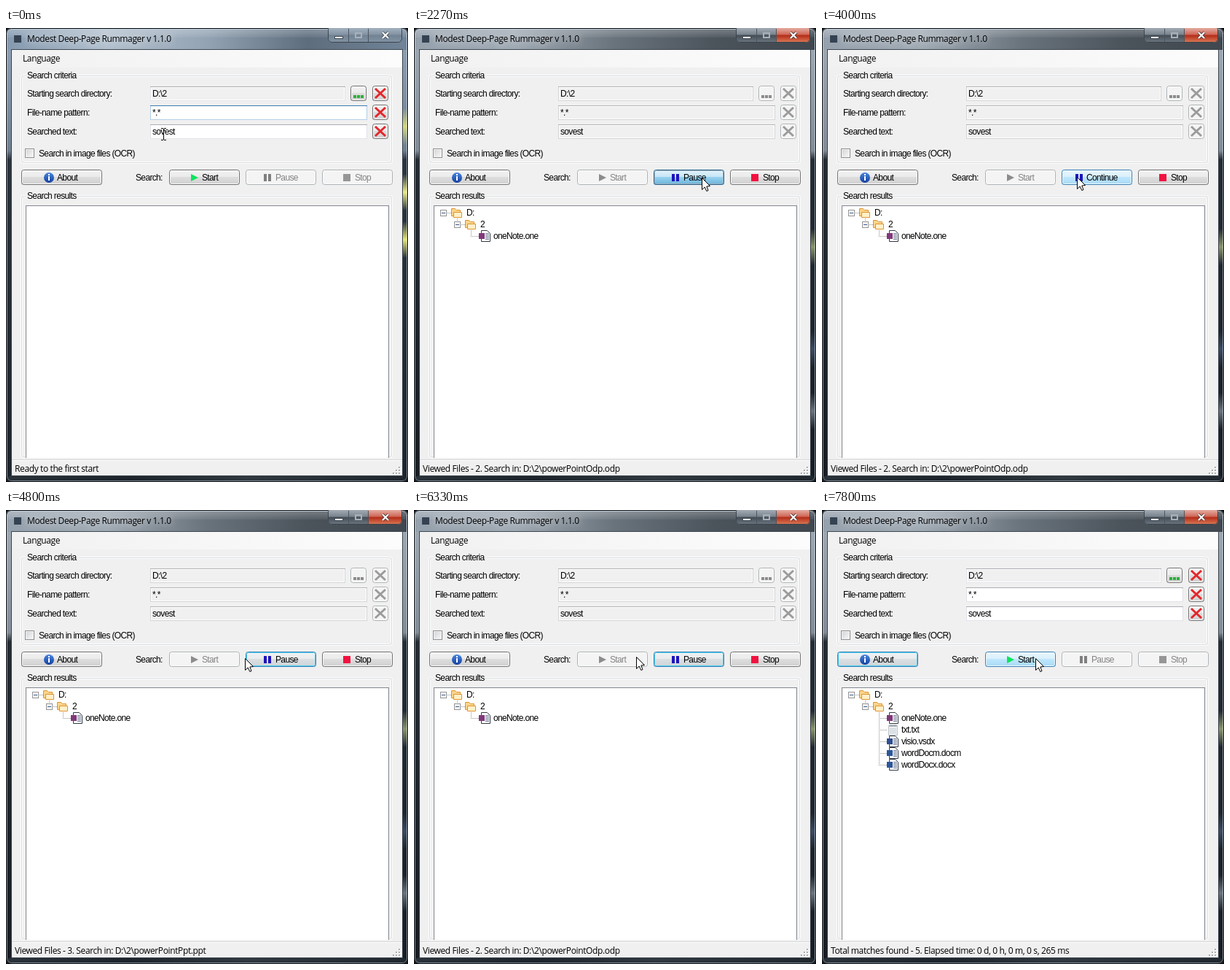
An HTML page with a canvas that plays this animation: 552 by 622 pixels, repeating every 8000 ms.

```html
<!DOCTYPE html>
<html lang="en">
<head>
<meta charset="utf-8">
<title>File search</title>
<style>
html, body { margin: 0; width: 100%; height: 100%; overflow: hidden; background: #000; }
canvas { display: block; width: 552px; height: 622px; }
</style>
</head>
<body>
<canvas id="stage" width="552" height="622"></canvas>
<script>
const ctx = document.getElementById('stage').getContext('2d');
const LOOP = 8000, STEP = 1000 / 15;
const FORM = { font: '12px "Liberation Sans", Arial, sans-serif', spacing: '-0.65px' };
const SYSTEM = { font: '12px "Open Sans", "Noto Sans", sans-serif', spacing: '-0.38px' };

// Files in search order; the icon colour marks those that match.
const FILES = [
  ['oneNote.one', '#80397b'], ['powerPointOdp.odp'], ['powerPointPpt.ppt'],
  ['powerPointPptm.pptm'], ['powerPointPptx.pptx'], ['txt.txt', 'note'],
  ['visio.vsdx', '#2f4f8f'], ['wordDocm.docm', '#2b579a'], ['wordDocx.docx', '#2b579a'],
  ['worDoc.doc'], ['wordRtf.rtf', '#2b579a'], ['xml.xml', 'faint']
];

// Pointer stops: step, x, y. Between stops it moves evenly.
const POINTER = [
  [0, 216, 144], [3, 226, 183], [13, 226, 183], [14, 408, 202], [19, 408, 202], [23, 412, 203],
  [33, 412, 203], [35, 377, 207], [36, 377, 207], [39, 356, 204], [49, 356, 204], [50, 336, 201],
  [53, 283, 203], [54, 283, 203], [62, 372, 204], [67, 350, 203], [71, 350, 203], [72, 328, 203],
  [84, 400, 202], [87, 450, 200], [92, 282, 200], [94, 282, 200], [99, 397, 203],
  [101, 397, 203], [103, 405, 204], [105, 448, 203], [111, 448, 203], [117, 293, 203], [120, 293, 203]
];

function pointerAt(step) {
  const i = Math.max(1, POINTER.findIndex(p => p[0] >= step));
  const [s0, x0, y0] = POINTER[i - 1], [s1, x1, y1] = POINTER[i];
  const u = (step - s0) / (s1 - s0);
  return { x: Math.round(x0 + (x1 - x0) * u), y: Math.round(y0 + (y1 - y0) * u) };
}

// Mode of the search and number of the file being viewed.
function searchAt(step) {
  if (step < 14) return { mode: 'ready', file: 0 };
  if (step < 22) return { mode: 'paused', file: 1 };
  if (step < 43) return { mode: 'running', file: 2 };
  if (step < 66) return { mode: 'paused', file: 2 };
  if (step < 82) return { mode: 'running', file: Math.max(3, step - 69) };
  if (step < 95) return { mode: 'done', file: 13, time: '2 s, 528' };
  if (step < 98) return { mode: 'running', file: 2 + (step - 95) * 3 };
  if (step < 110) return { mode: 'paused', file: 10 };
  return { mode: 'done', file: 10, time: '0 s, 265' };
}

function rect(x, y, w, h, color) {
  ctx.fillStyle = color;
  ctx.fillRect(x, y, w, h);
}

function frame(x, y, w, h, color) {
  ctx.strokeStyle = color;
  ctx.lineWidth = 1;
  ctx.strokeRect(x + .5, y + .5, w - 1, h - 1);
}

function outline(x, y, w, h, r, color) {
  ctx.beginPath();
  ctx.roundRect(x + .5, y + .5, w - 1, h - 1, r);
  ctx.strokeStyle = color;
  ctx.lineWidth = 1;
  ctx.stroke();
}

function gradient(x0, y0, x1, y1, ...stops) {
  const g = ctx.createLinearGradient(x0, y0, x1, y1);
  stops.forEach(([at, color]) => g.addColorStop(at, color));
  return g;
}

function poly(points, fill, stroke) {
  ctx.beginPath();
  points.forEach(([x, y]) => ctx.lineTo(x, y));
  ctx.closePath();
  ctx.fillStyle = fill;
  ctx.fill();
  if (stroke) {
    ctx.strokeStyle = stroke;
    ctx.lineWidth = 1;
    ctx.stroke();
  }
}

function cross(x, y, w, h, width, color) {
  ctx.lineWidth = width;
  ctx.strokeStyle = color;
  ctx.beginPath();
  ctx.moveTo(x, y); ctx.lineTo(x + w, y + h);
  ctx.moveTo(x + w, y); ctx.lineTo(x, y + h);
  ctx.stroke();
}

function text(str, x, y, color = '#000', style = FORM) {
  ctx.font = style.font;
  ctx.letterSpacing = style.spacing;
  ctx.fillStyle = color;
  ctx.fillText(str, x, y);
}

function dots(x, y, w, h) {
  for (let i = 0; i < Math.max(w, h); i += 2) rect(x + (w > h ? i : 0), y + (h > w ? i : 0), 1, 1, '#909090');
}

const SKINS = {
  normal: ['#707070', '#fcfcfc', '#f2f2f2', '#ebebeb', '#dddddd', '#cfcfcf'],
  disabled: ['#adb2b5', '#fcfcfc', '#f4f4f4', '#f4f4f4', '#f4f4f4', '#f4f4f4'],
  focused: ['#3c7fb1', '#48cdf2', '#f0f2f3', '#e9ebec', '#dbdfe2', '#cdd3d7'],
  hover: ['#3c7fb1', '#f0faff', '#eaf6fd', '#d9f0fc', '#bee6fd', '#a7d9f5'],
  pressed: ['#2c628b', '#9eb0ba', '#e5f4fc', '#c4e5f6', '#98d1ef', '#68b3db']
};

function button(x, y, w, h, skin) {
  const [edge, inner, a, b, c, d] = SKINS[skin];
  ctx.beginPath();
  ctx.roundRect(x, y, w, h, 3);
  ctx.fillStyle = gradient(0, y, 0, y + h, [0, a], [.48, b], [.5, c], [1, d]);
  ctx.fill();
  outline(x + 1, y + 1, w - 2, h - 2, 2, inner);
  outline(x, y, w, h, 3, edge);
}

const EDGES = {
  normal: ['#abadb3', '#e2e3ea'],
  focused: ['#3d7bad', '#b5cfe7'],
  disabled: ['#b4b4b4', '#d4d4d4']
};

function field(y, w, value, edge, editable) {
  const [top, side] = EDGES[edge];
  rect(198, y, w, 20, '#fff');
  if (!editable) rect(200, y + 2, w - 4, 16, '#f0f0f0');
  frame(198, y, w, 20, side);
  rect(198, y, w, 1, top);
  text(value, 201, y + 14);
}

function clearButton(y, enabled) {
  button(503, y, 22, 21, enabled ? 'normal' : 'disabled');
  cross(507, y + 4, 14, 13, 3, enabled ? '#e3262b' : '#9b9b9b');
}

function groupBox(y, h, label, labelWidth) {
  outline(20, y - 1, 511, h + 1, 3, '#fff');
  outline(22, y + 1, 507, h - 3, 2, '#fff');
  outline(21, y, 509, h - 1, 3, '#d5dadf');
  rect(27, y - 2, labelWidth, 5, '#f0f0f0');
  text(label, 29, y + 4);
}

// Tints of the glass: upper and lower sides, then the title bar from left to right.
const GLASS = {
  idle: ['#93a6b9', '#6f8090', '#2b343e', '#1d242c', '#8499af', '#b2c0ce', '#93a3b3', '#5e6d7d', '#718499'],
  active: ['#a3aeb9', '#828d98', '#252c33', '#181d23', '#95a1ad', '#9fa9b3', '#69737c', '#4b535b', '#40474e']
};

function drawGlass(inactive) {
  const [upper, middle, lower, base, ...bar] = GLASS[inactive ? 'idle' : 'active'];
  rect(0, 0, 552, 622, '#080a0c');
  ctx.beginPath();
  ctx.roundRect(0, 0, 552, 622, [7, 7, 5, 5]);
  ctx.fillStyle = gradient(0, 0, 0, 622, [0, upper], [.27, middle], [.29, lower], [1, base]);
  ctx.fill();
  rect(2, 2, 548, 28, gradient(0, 0, 552, 0, ...bar.map((c, i) => [[0, .25, .5, .75, 1][i], c])));
  rect(2, 2, 548, 11, gradient(0, 2, 0, 13, [0, 'rgba(255,255,255,.25)'], [1, 'rgba(255,255,255,.05)']));
  const patches = inactive ? [[135, '#d9d978'], [225, '#eeee80'], [290, '#e8e870']]
                           : [[300, '#8b9668'], [440, '#3c4b63'], [525, '#6c757d']];
  patches.forEach(([y, c]) => rect(545, y - 25, 6, 50, gradient(0, y - 25, 0, y + 25, [0, c + '00'], [.5, c], [1, c + '00'])));
  rect(2, 614, 548, 7, gradient(0, 0, 552, 0, [0, '#2a323a'], [.3, '#1d242b'], [.6, '#303840'], [1, '#20272e']));
  outline(1, 1, 550, 620, 6, 'rgba(205,219,230,.55)');
  outline(0, 0, 552, 622, 7, '#0d1013');
  frame(7, 29, 538, 585, '#3e4751');
}

function drawCaption(inactive) {
  rect(11, 10, 10, 10, '#344252');
  ctx.save();
  ctx.shadowColor = '#fff';
  ctx.shadowBlur = 10;
  text('Modest Deep-Page Rummager v 1.1.0', 29, 19, '#000', SYSTEM);
  ctx.restore();

  const plain = inactive
    ? [[0, '#a4b2c0'], [.45, '#8393a3'], [.5, '#718293'], [1, '#8293a4']]
    : [[0, '#a3acb5'], [.45, '#79838d'], [.5, '#444d56'], [1, '#6c7781']];
  const red = [[0, '#e4ada2'], [.45, '#cf6656'], [.5, '#b32c18'], [1, '#dd7b57']];
  ctx.save();
  ctx.beginPath();
  ctx.roundRect(442, 0, 102, 20, [0, 0, 5, 5]);
  ctx.clip();
  rect(442, 0, 55, 20, gradient(0, 0, 0, 20, ...plain));
  rect(497, 0, 47, 20, gradient(0, 0, 0, 20, ...(inactive ? plain : red)));
  ctx.restore();
  outline(442, -3, 102, 23, 5, '#3b444c');
  rect(470, 1, 1, 18, '#4b555f');
  rect(497, 1, 1, 18, '#4b555f');
  rect(451, 11, 12, 4, '#414a54');
  rect(452, 12, 10, 2, '#fff');
  frame(479, 6, 10, 8, '#a8b1ba');
  frame(480, 7, 8, 6, '#a8b1ba');
  cross(517, 6, 8, 8, 4, inactive ? '#4a545e' : '#5c3a38');
  cross(517, 6, 8, 8, 2.2, '#fff');
}

function drawCriteria(enabled, step) {
  const edge = enabled ? 'normal' : 'disabled';
  groupBox(65, 121, 'Search criteria', 72);
  text('Starting search directory:', 29, 94);
  text('File-name pattern:', 29, 120);
  text('Searched text:', 29, 146);
  field(80, 268, 'D:\\2', edge, false);
  field(106, 298, '*.*', step < 1 ? 'focused' : edge, enabled);
  field(132, 298, 'sovest', step === 1 ? 'focused' : edge, enabled);
  button(473, 79, 22, 21, enabled ? 'normal' : 'disabled');
  for (let i = 0; i < 3; i++) rect(477 + i * 5, 92, 4, 4, enabled ? '#2eae3c' : '#8c8c8c');
  [79, 105, 131].forEach(y => clearButton(y, enabled));
  rect(26, 165, 13, 13, '#f4f4f4');
  frame(26, 165, 13, 13, '#8e8f8f');
  rect(28, 167, 9, 9, gradient(28, 167, 37, 176, [0, '#d3d6da'], [1, '#f6f6f6']));
  text('Search in image files (OCR)', 45, 176);
}

function drawActions(mode, mouse, step) {
  const idle = mode === 'ready' || mode === 'done';
  const skin = (x, enabled, focused) => {
    if (!enabled) return 'disabled';
    const over = mouse.x >= x && mouse.x < x + 97 && mouse.y >= 194 && mouse.y < 215;
    if (over) return [34, 42, 65, 94, 97, 109].includes(step) ? 'pressed' : 'hover';
    return focused ? 'focused' : 'normal';
  };
  const ink = on => on ? '#000' : '#838383';

  button(21, 194, 111, 21, mode === 'done' ? 'focused' : 'normal');
  ctx.beginPath();
  ctx.arc(59, 205, 7, 0, Math.PI * 2);
  ctx.fillStyle = gradient(0, 198, 0, 212, [0, '#4a86e0'], [1, '#123f9f']);
  ctx.fill();
  rect(58, 200, 2, 2, '#fff');
  rect(58, 203, 2, 6, '#fff');
  text('About', 70, 209);

  text('Search:', 178, 209);
  button(224, 194, 97, 21, skin(224, idle));
  poly([[254, 200], [264, 205], [254, 210]], idle ? '#0be45c' : '#8c8c8c');
  text('Start', 269, 209, ink(idle));

  const paused = mode === 'paused', x = paused ? 348 : 354;
  button(329, 194, 97, 21, skin(329, !idle, true));
  rect(x, 200, 4, 10, idle ? '#808080' : '#1d14bd');
  rect(x + 6, 200, 4, 10, idle ? '#808080' : '#1d14bd');
  text(paused ? 'Continue' : 'Pause', x + (paused ? 15 : 16), 209, ink(!idle));

  button(434, 194, 97, 21, skin(434, !idle));
  rect(463, 200, 10, 10, idle ? '#969696' : '#f1123f');
  text('Stop', 479, 209, ink(!idle));
}

function folder(x, y) {
  poly([[x + .5, y + 11.5], [x + .5, y + 1.5], [x + 5.5, y + 1.5], [x + 7.5, y + 3.5], [x + 12.5, y + 3.5], [x + 12.5, y + 11.5]], '#fbd48a', '#dd9433');
  poly([[x + 3.5, y + 13.5], [x + 3.5, y + 6.5], [x + 14.5, y + 6.5], [x + 14.5, y + 13.5]], '#fff0c8', '#dd9433');
}

function expander(x, y) {
  rect(x, y, 9, 9, '#fff');
  frame(x, y, 9, 9, '#929292');
  rect(x + 2, y + 4, 5, 1, '#365585');
}

function fileIcon(y, kind) {
  if (kind === 'note') {
    rect(91, y - 6, 13, 14, '#edf0f2');
    frame(91, y - 6, 13, 14, '#b9c1c8');
    for (let i = 0; i < 5; i++) {
      rect(93 + i * 2, y - 7, 1, 3, '#7c878f');
      if (i < 4) rect(93, y - 2 + i * 2, 9, 1, '#c9d1d7');
    }
    return;
  }
  const faint = kind === 'faint';
  poly([[92.5, y - 7.5], [100.5, y - 7.5], [104.5, y - 3.5], [104.5, y + 7.5], [92.5, y + 7.5]], '#fff', faint ? '#c9c9c9' : '#333a44');
  if (faint) {
    ctx.beginPath();
    ctx.arc(98, y + 1, 3, 0, Math.PI * 2);
    ctx.strokeStyle = '#c4c4c4';
    ctx.stroke();
    return;
  }
  for (let i = 0; i < 5; i++) rect(98, y - 4 + i * 2, 5, 1, '#6d7a8d');
  rect(89, y - 4, 8, 8, kind);
}

function drawResults(file) {
  groupBox(230, 359, 'Search results', 71);
  rect(27, 243, 499, 346, '#fff');
  rect(27, 243, 499, 1, '#828790');
  rect(27, 243, 1, 346, '#828790');
  rect(525, 243, 1, 346, '#828790');
  if (!file) return;
  const found = FILES.slice(0, file - 1).filter(f => f[1]);
  dots(46, 253, 5, 1);
  dots(59, 261, 1, 9);
  dots(59, 269, 11, 1);
  expander(36, 249);
  folder(51, 246);
  text('D:', 72, 257);
  folder(70, 262);
  text('2', 91, 273);
  if (!found.length) return;
  expander(55, 265);
  dots(78, 277, 1, found.length * 16 - 7);
  found.forEach(([name, kind], i) => {
    const y = 285 + i * 16;
    dots(78, y, 11, 1);
    fileIcon(y, kind);
    text(name, 109, y + 4);
  });
}

function drawStatus({ mode, file, time }) {
  rect(8, 589, 536, 24, '#f0f0f0');
  rect(8, 591, 536, 1, '#d4d6d8');
  rect(8, 592, 536, 1, '#fff');
  const matches = FILES.slice(0, Math.max(0, file - 1)).filter(f => f[1]).length;
  const message = mode === 'ready' ? 'Ready to the first start'
    : mode === 'done' ? `Total matches found - ${matches}. Elapsed time: 0 d, 0 h, 0 m, ${time} ms`
    : `Viewed Files - ${file}. Search in: D:\\2\\${FILES[file - 1][0]}`;
  text(message, 12, 608, '#000', SYSTEM);
  for (let row = 0; row < 3; row++)
    for (let col = 2 - row; col < 3; col++) {
      rect(532 + col * 4, 602 + row * 4, 2, 2, '#fff');
      rect(531 + col * 4, 601 + row * 4, 2, 2, '#a9adb1');
    }
}

function drawPointer({ x, y }, beam) {
  if (beam) {
    rect(x, y - 6, 1, 15, '#000');
    for (const end of [y - 7, y + 9]) {
      rect(x - 3, end, 3, 1, '#000');
      rect(x + 1, end, 3, 1, '#000');
    }
    return;
  }
  poly([[0, 0], [0, 16], [3.7, 12.5], [6.3, 18], [8.5, 17], [6.3, 11.5], [11, 11]]
    .map(([dx, dy]) => [x + .5 + dx, y + .5 + dy]), '#fff', '#000');
}

function draw(time) {
  const step = Math.floor((time % LOOP + 3.4) / STEP) % 120;
  const search = searchAt(step), mouse = pointerAt(step);
  const idle = search.mode === 'ready' || search.mode === 'done';
  const inactive = search.mode === 'ready';
  drawGlass(inactive);
  drawCaption(inactive);
  rect(8, 30, 536, 583, '#f0f0f0');
  rect(8, 30, 536, 24, gradient(8, 0, 544, 0, [0, '#f1f1f1'], [1, '#fcfcfc']));
  text('Language', 23, 46, '#000', SYSTEM);
  drawCriteria(idle, step);
  drawActions(search.mode, mouse, step);
  drawResults(search.file);
  drawStatus(search);
  drawPointer(mouse, step < 2);
}

const start = performance.now();
function tick() {
  draw(performance.now() - start);
  requestAnimationFrame(tick);
}
tick();
</script>
</body>
</html>
```
